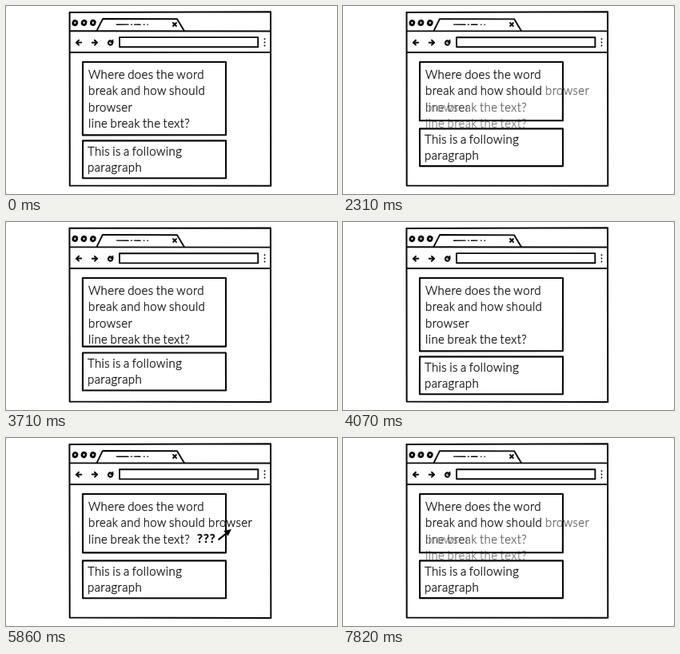
Recreate the animation shown at these times as an HTML page with a canvas. Size 414x235 px, loop 8000 ms.

```html
<!DOCTYPE html>
<html lang="en">
<head>
<meta charset="utf-8">
<title>Line break</title>
<style>
  html, body { margin: 0; width: 100%; height: 100%; overflow: hidden; background: #fff; }
  canvas { display: block; width: 414px; height: 235px; }
</style>
</head>
<body>
<canvas id="stage"></canvas>
<script>
const W = 414, H = 235, LOOP = 8000;
const STEP = 177.6, CYCLE = 31;
const INK = '#080808';
const canvas = document.getElementById('stage');
const ctx = canvas.getContext('2d');
const ratio = window.devicePixelRatio || 1;
canvas.width = W * ratio;
canvas.height = H * ratio;

const clamp = v => Math.min(1, Math.max(0, v));
const ease = v => { v = clamp(v); return v * v * (3 - 2 * v); };
const span = (k, a, b) => ease((k - a) / (b - a));

let seed = 1;
function wobble(amount = 0.12) {
  seed = (seed * 16807) % 2147483647;
  return (seed / 2147483647 - 0.5) * 2 * amount;
}

function stroke(points, width = 2, closed = false) {
  ctx.lineWidth = width;
  ctx.beginPath();
  points.forEach(([x, y]) => ctx.lineTo(x + wobble(), y + wobble()));
  if (closed) ctx.closePath();
  ctx.stroke();
}

function box(x1, y1, x2, y2, width = 2) {
  stroke([[x1, y1], [x2, y1], [x2, y2], [x1, y2]], width, true);
}

function dot(x, y, r) {
  ctx.beginPath();
  ctx.arc(x, y, r, 0, Math.PI * 2);
  ctx.fill();
}

function fill(points) {
  ctx.beginPath();
  points.forEach(([x, y]) => ctx.lineTo(x, y));
  ctx.fill();
}

// A hairline outline gives the light face a little more weight.
function text(str, x, y, alpha = 1) {
  if (alpha <= 0) return;
  ctx.globalAlpha = alpha;
  ctx.lineWidth = 0.3;
  ctx.strokeText(str, x, y);
  ctx.fillText(str, x, y);
  ctx.globalAlpha = 1;
}

function drawWindow() {
  stroke([[79.5, 7.9], [331, 7.3], [331.2, 224.9], [79.7, 224.5]], 2, true);
  stroke([[80, 31.3], [331, 31.5]], 1.9);
  stroke([[80, 58], [331, 58]], 1.9);
  stroke([[113.5, 31], [121, 16], [214, 16.3], [223, 31]], 1.9);

  for (const x of [86.4, 97.5, 108.8]) {
    ctx.lineWidth = 2.8;
    ctx.beginPath();
    ctx.ellipse(x + wobble(), 21 + wobble(), 2.4, 2.7, 0.3, 0, Math.PI * 2);
    ctx.stroke();
  }

  for (const [a, b] of [[138.5, 153], [156.5, 157.5], [160.5, 168], [172.5, 173], [177, 177.5]]) {
    stroke([[a, 23.2], [b, 23.2]], 1.4);
  }
  stroke([[209, 21], [213, 25]], 1.9);
  stroke([[213, 21], [209, 25]], 1.9);

  // Navigation arrows and reload
  for (const [x, d] of [[91, 1], [111, -1]]) {
    stroke([[x - 3 * d, 45.7], [x + 3.2 * d, 45.7]], 2);
    stroke([[x, 42.8], [x - 3 * d, 45.7], [x, 48.6]], 2);
  }
  ctx.lineWidth = 2.2;
  ctx.beginPath();
  ctx.arc(130.6, 46, 2.6, 0.3, 5.1);
  ctx.stroke();
  fill([[129.8, 46], [134.2, 41.2], [134.6, 46.2]]);

  box(142, 39.2, 315.3, 51.3, 1.9);
  for (const y of [41.3, 45.5, 49.5]) dot(323.5, y, 0.95);
}

function drawQuestion(alpha) {
  if (alpha <= 0) return;
  ctx.font = '700 15px Lato, sans-serif';
  ctx.letterSpacing = '1px';
  text('???', 239, 131.4, alpha);
  ctx.globalAlpha = alpha;
  stroke([[266.3, 126.8], [275.5, 119.3]], 2.2);
  fill([[282, 114], [277.6, 122.6], [272.2, 116]]);
  ctx.globalAlpha = 1;
}

function drawPage(k) {
  const wrap = span(k, 8.3, 14.2);
  const grow = span(k, 15.5, 19.5);
  const shift = 15 * grow;

  box(96, 70, 275, 143.3 + 18 * grow, 2.1);
  box(96, 153.3 + shift, 275, 200.2 + shift, 2.1);

  ctx.font = '300 15px Lato, sans-serif';
  ctx.letterSpacing = '0.4px';
  ctx.wordSpacing = '-1.3px';
  text('Where does the word', 103, 91);
  text('break and how should', 103, 111.3);
  text('browser', 253, 111.3, 1 - wrap);
  text('line break the text?', 103, 131.7, 1 - wrap);
  text('browser', 103, 131.7, wrap);
  text('line break the text?', 103, 152, wrap);
  text('This is a following', 102, 171.7 + shift);
  text('paragraph', 102, 192 + shift);

  drawQuestion(1 - span(k, 7, 9));
}

// The hand-drawn line rests for a few steps near the end of each cycle.
function linePose(k) {
  if (k >= 28) return 28;
  return k >= 22 && k < 25 ? 22 : k;
}

function draw(now) {
  const step = Math.floor((now % LOOP + 10) / STEP);
  const k = (step + CYCLE - 2) % CYCLE;
  seed = 7919 * (linePose(k) + 1);
  ctx.setTransform(ratio, 0, 0, ratio, 0, 0);
  ctx.fillStyle = '#fff';
  ctx.fillRect(0, 0, W, H);
  ctx.fillStyle = ctx.strokeStyle = INK;
  ctx.lineJoin = 'round';
  ctx.lineCap = 'round';
  drawWindow();
  drawPage(k);
}

const start = performance.now();
function tick() {
  draw(performance.now() - start);
  requestAnimationFrame(tick);
}
tick();
</script>
</body>
</html>
```
